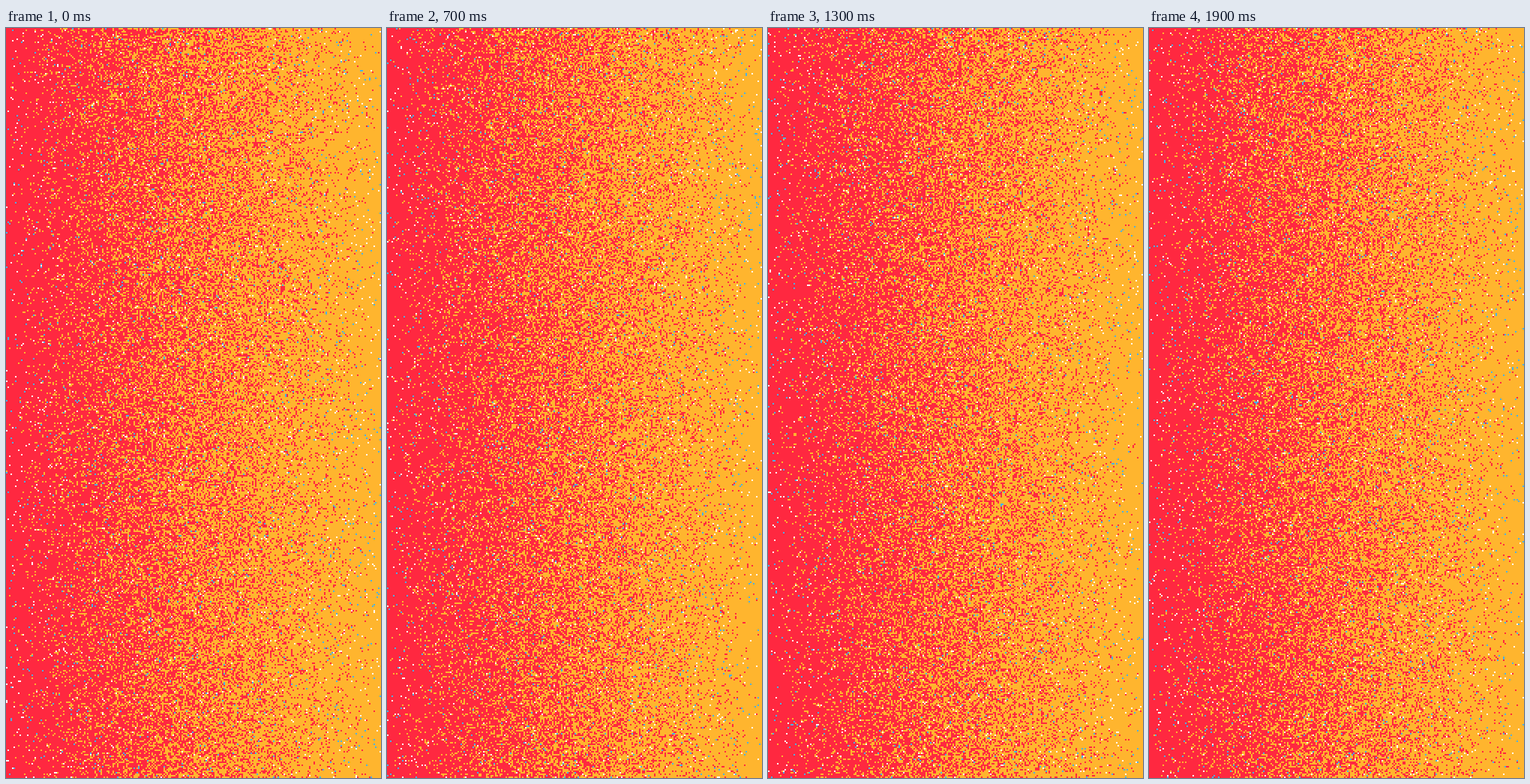
Animation of 500x1000 px, one loop 2000 ms. Source, as an HTML page with a canvas:

```html
<!DOCTYPE html>
<html>
<head>
<meta charset="utf-8">
<style>
  html, body { margin: 0; width: 100%; height: 100%; overflow: hidden; background: #ff2840; }
  canvas { display: block; width: 500px; height: 1000px; image-rendering: pixelated; }
</style>
</head>
<body>
<canvas width="250" height="500"></canvas>
<script>
const W = 250, H = 500, STEPS = 20, STEP_MS = 100;
const ctx = document.querySelector('canvas').getContext('2d');
const image = ctx.createImageData(W, H);
const pixels = new Uint32Array(image.data.buffer);

// Colours as ABGR words
const RED = 0xff4028ff, AMBER = 0xff2eb5ff, WHITE = 0xffffffff, BLUE = 0xffe6b04a;

function randomizer(seed) {
  return () => {
    seed = (seed + 0x6d2b79f5) | 0;
    let t = Math.imul(seed ^ (seed >>> 15), 1 | seed);
    t = (t + Math.imul(t ^ (t >>> 7), 61 | t)) ^ t;
    return ((t ^ (t >>> 14)) >>> 0) / 4294967296;
  };
}

const clamp = v => Math.min(1, Math.max(0, v));
const smooth = v => v * v * (3 - 2 * v);

// Share of amber: close to linear, easing off near both sides
const amberShare = u => 0.6 * u + 0.4 * smooth(u);

function draw(step) {
  const random = randomizer(step * 7919 + 17);
  const phase = step / STEPS * Math.PI * 2;
  for (let y = 0, i = 0; y < H; y++) {
    // The blend edge sways gently down the stage
    const sway = 0.01 * Math.sin(y / 48 - phase - 1.5);
    for (let x = 0; x < W; x++, i++) {
      const u = (x + 0.5) / W;
      const shifted = clamp(u - sway * Math.sin(u * Math.PI));
      const speck = random(), mix = random();
      pixels[i] = speck < 0.012 ? WHITE
        : speck < 0.024 ? BLUE
        : mix < amberShare(shifted) ? AMBER : RED;
    }
  }
  ctx.putImageData(image, 0, 0);
}

let shown = -1;
function tick() {
  const step = Math.floor(performance.now() / STEP_MS) % STEPS;
  if (step !== shown) draw(shown = step);
  requestAnimationFrame(tick);
}
tick();
</script>
</body>
</html>
```
